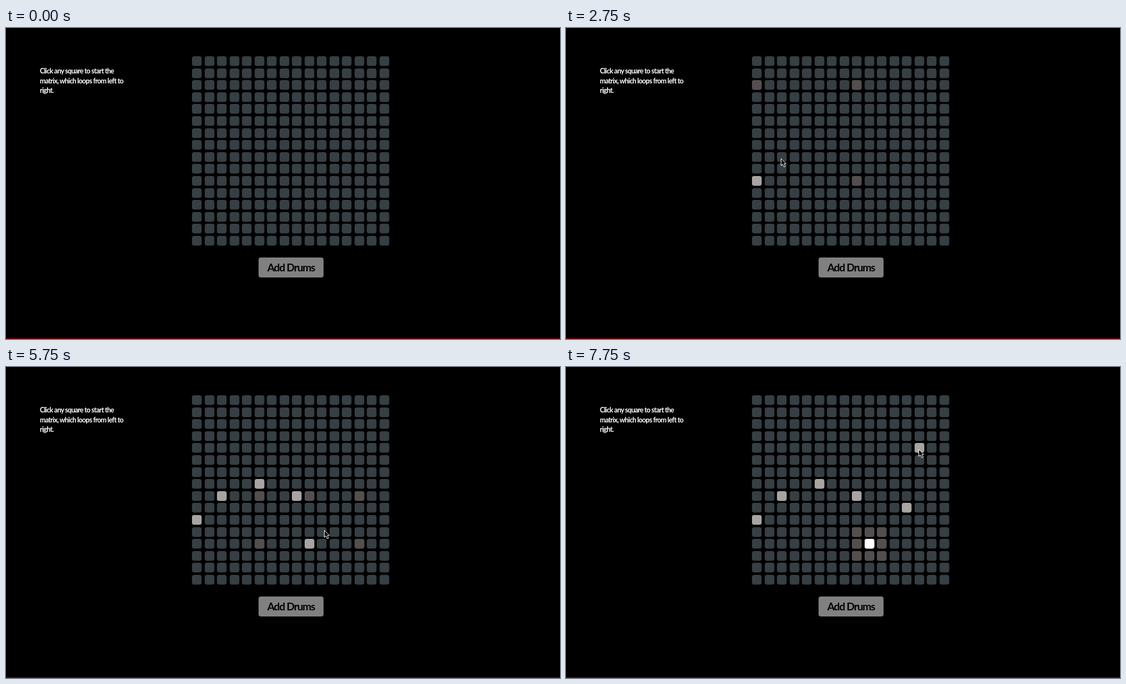
Animation of 998 by 561 pixels, one loop 8000 ms. Source, as an HTML page with a canvas:

```html
<!DOCTYPE html>
<html lang="en">
<head>
<meta charset="utf-8">
<title>Tone matrix</title>
<style>
  html, body { margin: 0; width: 100%; height: 100%; overflow: hidden; background: #000; }
  body { position: relative; font-family: Lato, "Open Sans", sans-serif; font-weight: 700; }
  canvas { position: absolute; left: 0; top: 0; }
  p {
    position: absolute; left: 61px; top: 69px; margin: 0;
    color: #fff; font-size: 12.5px; line-height: 17.5px; letter-spacing: -.75px; white-space: nowrap;
  }
  .drums {
    position: absolute; left: 455px; top: 414px; width: 117px; height: 36px;
    border-radius: 4px; background: #808080; color: #000;
    font-size: 19px; line-height: 35px; letter-spacing: -1.1px; text-align: center; white-space: nowrap;
  }
  .rule { position: absolute; left: 0; top: 559px; width: 100%; height: 2px; background: #580000; }
</style>
</head>
<body>
<p>Click any square to start the<br>matrix, which loops from left to<br>right.</p>
<div class="drums">Add Drums</div>
<div class="rule"></div>
<canvas id="stage" width="998" height="561"></canvas>
<script>
const ctx = document.getElementById('stage').getContext('2d');
const LOOP = 8000, TICK = 250, SIZE = 16;
const STEP = 4.4, SWEEP = 58.6; // beats per column, beat when the playhead enters
const IDLE = '#363f43', RING = '#544f4f', LIT = '#a8a4a4', HIT = '#fff';

// Clicked squares: column, row, beat
const notes = [[0, 10, 7], [2, 8, 17], [5, 7, 34], [8, 8, 48], [9, 12, 59], [12, 9, 71], [13, 4, 93]]
  .map(([col, row, beat]) => ({ col, row, beat }));

// A note ripples when clicked and again when the playhead strikes it
const strikes = notes
  .map(n => ({ ...n, beat: SWEEP + STEP * n.col, clicked: n.beat, struck: true }))
  .filter(s => s.beat > s.clicked);
const ripples = [...notes, ...strikes].sort((a, b) => a.beat - b.beat);

const path = [{ col: 3.3, row: 8.1, beat: -27 }, { ...notes[0], beat: -13 }, ...notes];
const arrow = new Path2D('M.5 .8V13.3L3.4 10.6 5.6 15.7 8 14.7 5.9 9.8H9.6Z');

const colX = c => 335 + 22.5 * c;
const rowY = r => 51 + 21.6 * r;
const mix = (a, b, k) => a + (b - a) * k;

// Beats pass in a rhythm of four long ticks and one short one
function beatAt(tick) {
  const n = tick - 8, bar = Math.floor(n / 5);
  return 21 * bar + 5 * (n - 5 * bar);
}

function cell(col, row, color) {
  if (col < 0 || row < 0 || col >= SIZE || row >= SIZE) return;
  ctx.fillStyle = color;
  ctx.beginPath();
  ctx.roundRect(Math.round(colX(col)), Math.round(rowY(row)), 17.4, 17.4, 4);
  ctx.fill();
}

function ring(col, row, r) {
  for (let i = -1; i <= 1; i++)
    for (let j = -1; j <= 1; j++)
      if (i || j) cell(col + i * r, row + j * r, RING);
}

// The pointer glides to the next square, then waits there to click
function pointer(beat) {
  const i = path.findLastIndex(p => p.beat <= beat);
  if (i < 0) return;
  const a = path[i], b = path[i + 1] || a;
  const t = a === b ? 0 : Math.min(1, (beat - a.beat) / (b.beat - a.beat) / .75);
  const k = t * t * (3 - 2 * t);
  ctx.save();
  ctx.translate(Math.round(colX(mix(a.col, b.col, k)) + 7), Math.round(rowY(mix(a.row, b.row, k)) + 11));
  ctx.fillStyle = '#000';
  ctx.strokeStyle = '#fff';
  ctx.fill(arrow);
  ctx.stroke(arrow);
  ctx.restore();
}

function draw(now) {
  const beat = beatAt(Math.floor(now % LOOP / TICK));
  ctx.clearRect(0, 0, 998, 561);
  for (let c = 0; c < SIZE; c++)
    for (let r = 0; r < SIZE; r++) cell(c, r, IDLE);

  // Only the latest ripple shows
  const live = ripples.findLast(r => r.beat <= beat);
  const age = live ? beat - live.beat : 0;
  if (Math.round(age)) ring(live.col, live.row, Math.round(age));
  for (const n of notes)
    if (beat >= n.beat) cell(n.col, n.row, LIT);
  if (live && live.struck && age < STEP) cell(live.col, live.row, HIT);
  pointer(beat);
}

const start = performance.now();
function loop() {
  draw(performance.now() - start);
  requestAnimationFrame(loop);
}
loop();
</script>
</body>
</html>
```
